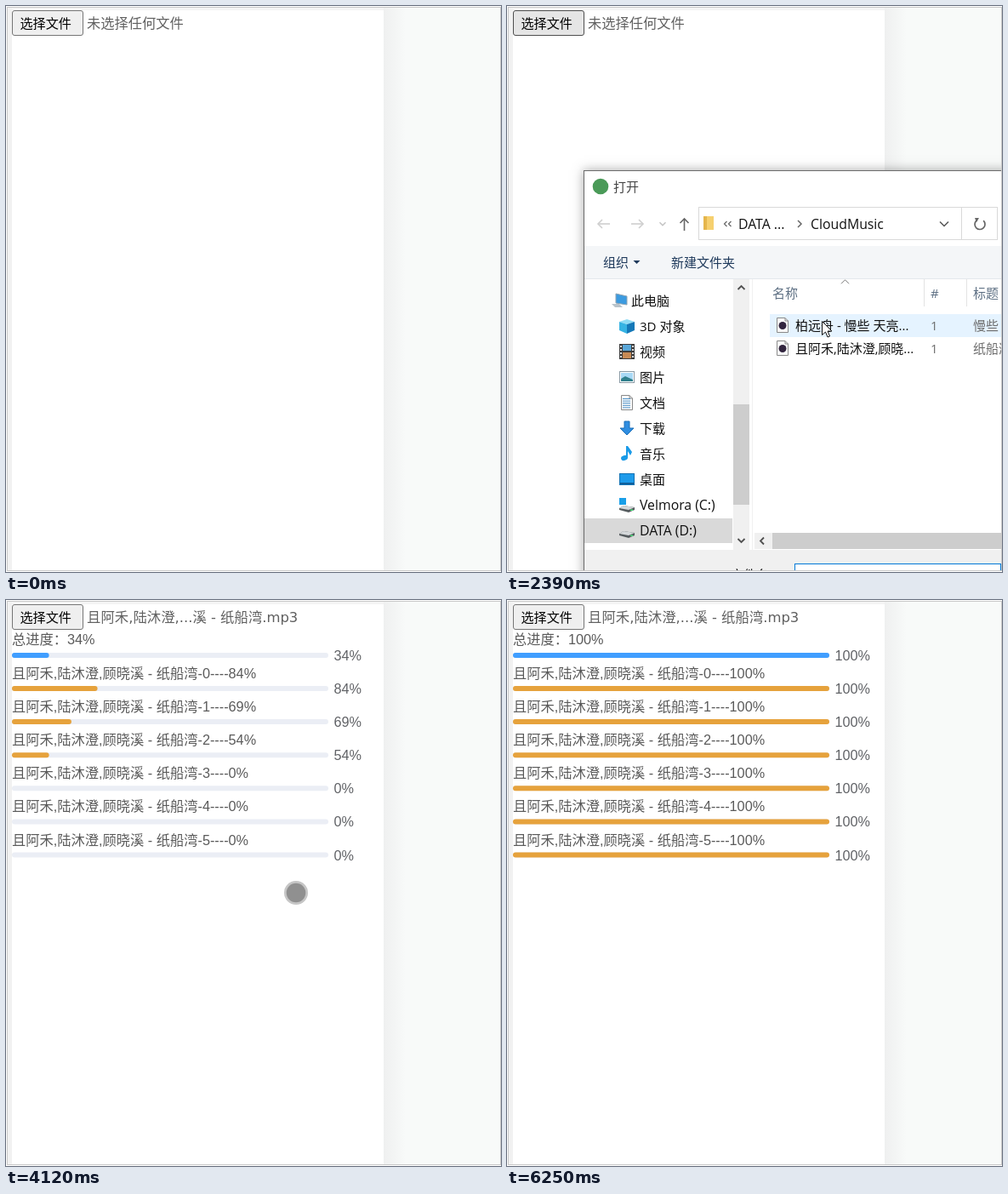
An HTML page with a canvas that plays this animation: 582x665 px, repeating every 6330 ms.

```html
<!DOCTYPE html>
<html lang="zh-CN">
<head>
<meta charset="utf-8">
<title>分片上传</title>
<style>
html, body { margin: 0; width: 100%; height: 100%; overflow: hidden; background: #fff; }
canvas { display: block; width: 582px; height: 665px; }
</style>
</head>
<body>
<canvas id="stage" width="582" height="665"></canvas>
<script>
const ctx = document.getElementById('stage').getContext('2d');
const LOOP = 6330;
const CJK = '"Noto Sans CJK SC", "Noto Sans CJK", sans-serif';
const UI = '"Open Sans", "Noto Sans", ' + CJK;
const PAGE = '"Liberation Sans", ' + CJK;
const WIDE = '"DejaVu Sans", ' + CJK;

const SONG = '纸船湾';
const TRACK = '且阿禾,陆沐澄,顾晓溪 - ' + SONG;
const PICKED = '且阿禾,陆沐澄,...溪 - ' + SONG + '.mp3';

// Pointer stops: time, x, y. Touch dot in the page, arrow over the dialog.
const DOT = 'dot', ARROW = 'arrow';
const pointer = [
  [0], [70, 91, 655, DOT], [140, 80, 470, DOT], [210, 55, 210, DOT], [280, 38, 75, DOT],
  [450, 35, 62, DOT], [530, 38, 45, DOT], [600, 46, 33, DOT], [680, 51, 31, DOT],
  [830, 58, 32, DOT], [910, 64, 34, DOT],
  [1440, 110, 50, ARROW], [1520, 190, 70, ARROW], [1600, 255, 85, ARROW], [1680, 310, 88, ARROW],
  [1760, 360, 85, ARROW], [1840, 390, 82, ARROW], [1990, 378, 150, ARROW], [2080, 366, 232, ARROW],
  [2220, 366, 300, ARROW], [2300, 368, 345, ARROW], [2390, 370, 370, ARROW], [2460, 369, 405, ARROW],
  [3580, 362, 388, DOT], [3650, 350, 360, DOT], [3730, 342, 345, DOT], [3880, 341, 344, DOT],
  [5540, 325, 390, DOT], [5620, 280, 520, DOT], [5700, 247, 614, DOT],
  [5850, 210, 640, DOT], [5940, 152, 664, DOT], [6030]
];

// Progress reports: time, percent
const total = [[3988, 34], [4200, 50], [4390, 78], [4590, 100]];
const chunks = [
  [[3994, 84], [4200, 100]], [[4007, 69], [4210, 100]], [[4022, 54], [4220, 100]],
  [[4320, 84], [4480, 100]], [[4340, 69], [4590, 100]], [[4350, 54], [4520, 100]]
];

function rect(x, y, w, h, fill, stroke) {
  if (fill) { ctx.fillStyle = fill; ctx.fillRect(x, y, w, h); }
  if (stroke) {
    ctx.strokeStyle = stroke; ctx.lineWidth = 1;
    ctx.strokeRect(x + .5, y + .5, w - 1, h - 1);
  }
}

function round(x, y, w, h, r, fill, stroke) {
  ctx.beginPath();
  ctx.roundRect(x, y, w, h, r);
  ctx.fillStyle = fill; ctx.fill();
  if (stroke) { ctx.strokeStyle = stroke; ctx.lineWidth = 1; ctx.stroke(); }
}

function circle(x, y, r, fill) {
  ctx.beginPath();
  ctx.arc(x, y, r, 0, Math.PI * 2);
  ctx.fillStyle = fill; ctx.fill();
}

function path(points, fill, stroke, width = 1, close = !!fill) {
  ctx.beginPath();
  points.forEach(([x, y], i) => i ? ctx.lineTo(x, y) : ctx.moveTo(x, y));
  if (close) ctx.closePath();
  if (fill) { ctx.fillStyle = fill; ctx.fill(); }
  if (stroke) { ctx.strokeStyle = stroke; ctx.lineWidth = width; ctx.stroke(); }
}

// y is the middle of the line
function text(str, x, y, color = '#111', size = 15, family = UI) {
  ctx.font = size + 'px ' + family;
  ctx.fillStyle = color;
  ctx.fillText(str, x, y + size * .37);
}

// Chevron pointing along (dx, dy)
function chevron(x, y, dx, dy, s, color, width = 1.5) {
  path([[x - dx * s / 2 + dy * s, y - dy * s / 2 + dx * s], [x + dx * s / 2, y + dy * s / 2],
    [x - dx * s / 2 - dy * s, y - dy * s / 2 - dx * s]], null, color, width);
}

function arrow(x, y, dx, dy, color) {
  path([[x - dx * 7, y - dy * 7], [x + dx * 7, y + dy * 7]], null, color, 1.6);
  chevron(x + dx * 4.5, y + dy * 4.5, dx, dy, 5, color, 1.6);
}

// CSS "ease"
function ease(x) {
  if (x >= 1) return 1;
  const bez = (u, a, b) => 3 * u * (1 - u) ** 2 * a + 3 * u * u * (1 - u) * b + u ** 3;
  let lo = 0, hi = 1;
  for (let i = 0; i < 20; i++) {
    const mid = (lo + hi) / 2;
    if (bez(mid, .25, .25) < x) lo = mid; else hi = mid;
  }
  return bez(lo, .1, 1);
}

function percent(steps, t) {
  return steps.reduce((p, [at, v]) => t >= at ? v : p, 0);
}

// Each report restarts a 600 ms width transition from the current width
function barWidth(steps, t) {
  let from = 0, to = 0, start = 0;
  const now = at => from + (to - from) * ease((at - start) / 600);
  for (const [at, v] of steps) {
    if (t < at) break;
    from = now(at); to = v; start = at;
  }
  return now(t);
}

function drawPage(t) {
  rect(0, 0, 582, 665, '#fff');
  rect(2, 2, 579, 662, '#f8faf9');
  rect(2, 2, 442, 3, '#f4f4f4');
  rect(2, 2, 5, 662, '#f1f1f1');
  const shade = ctx.createLinearGradient(444, 0, 470, 0);
  shade.addColorStop(0, '#eff0f0');
  shade.addColorStop(1, '#f8faf9');
  rect(444, 2, 26, 662, shade);
  rect(7, 5, 437, 659, '#fff');

  const active = t >= 830 && t < 3580;
  round(7.5, 5.5, 83, 29, 2.5, active ? '#e5e5e5' : '#efefef', active ? '#4f4f4f' : '#767676');
  text('选择文件', 16.5, 20, '#000', 15.1);
  if (t < 3100) text('未选择任何文件', 95, 20, '#606060', 16.25);
  else text(PICKED, 95, 20, '#606060', 16.4, WIDE);
  if (t >= 3580) drawProgress(t);
}

function bar(label, steps, t, labelY, y, color) {
  const p = percent(steps, t) + '%', w = barWidth(steps, t) * 3.72;
  text(label + p, 7, labelY, '#5a5a5a', 16.25, PAGE);
  round(7, y - 3, 372, 6, 3, '#ebeef5');
  if (w > 0) round(7, y - 3, w, 6, Math.min(3, w / 2), color);
  text(p, 385.5, y, '#606266', 16.25, PAGE);
}

function drawProgress(t) {
  bar('总进度：', total, t, 46, 65, '#409eff');
  chunks.forEach((c, i) => {
    bar(TRACK + '-' + i + '----', c, t, 86 + 39.1 * i, 104 + 39.1 * i, '#e6a23c');
  });
}

function sheet(x, y) {
  path([[x + .5, y + .5], [x + 10, y + .5], [x + 13.5, y + 4], [x + 13.5, y + 17.5], [x + .5, y + 17.5]],
    '#fafafa', '#8a8a8a');
  path([[x + 10, y + .5], [x + 10, y + 4], [x + 13.5, y + 4]], null, '#8a8a8a');
}

function audio(x, y) {
  sheet(x, y);
  circle(x + 7, y + 9.5, 4.5, '#33263f');
}

function pin(x, y) {
  ctx.save();
  ctx.translate(x, y);
  ctx.rotate(Math.PI / 4);
  rect(-3, -6, 6, 6, '#8a9299');
  rect(-5, 0, 10, 2, '#8a9299');
  rect(-.75, 2, 1.5, 6, '#8a9299');
  ctx.restore();
}

function drive(x, y) {
  path([[x, y + 2], [x + 5, y - 1], [x + 18, y + 1], [x + 18, y + 4], [x + 11, y + 7], [x, y + 4]], '#555b5e');
  path([[x, y + 2], [x + 5, y - 1], [x + 18, y + 1], [x + 11, y + 4]], '#d5d8da');
  rect(x + 13, y + 3.5, 3, 1.5, '#4be07a');
}

const icons = {
  pc(x, y) {
    path([[x + 5, y - 8], [x + 18, y - 5], [x + 18, y + 5], [x + 5, y + 3]], '#3c9be0', '#8fa4b3');
    path([[x, y + 4], [x + 9, y + 4], [x + 13, y + 8], [x + 4, y + 8]], '#b9c3ca');
  },
  cube(x, y) {
    path([[x, y - 5], [x + 9, y - 8], [x + 18, y - 5], [x + 9, y - 2]], '#8fdcf5');
    path([[x, y - 5], [x + 9, y - 2], [x + 9, y + 9], [x, y + 5]], '#36b3e3');
    path([[x + 18, y - 5], [x + 9, y - 2], [x + 9, y + 9], [x + 18, y + 5]], '#1578b8');
  },
  film(x, y) {
    rect(x, y - 9, 18, 18, '#3d3d3d');
    rect(x + 4, y - 8, 10, 7, '#5aa7d8');
    rect(x + 4, y + 1, 10, 7, '#c78a55');
    for (let i = 0; i < 4; i++) {
      rect(x + 1, y - 7 + i * 4, 2, 2, '#ddd');
      rect(x + 15, y - 7 + i * 4, 2, 2, '#ddd');
    }
  },
  picture(x, y) {
    rect(x, y - 7, 18, 14, '#fff', '#8a9aa5');
    rect(x + 2, y - 5, 14, 10, '#a8d8f5');
    path([[x + 2, y + 5], [x + 2, y + 2], [x + 7, y - 1], [x + 16, y + 3], [x + 16, y + 5]], '#2f7f8c');
  },
  doc(x, y) {
    sheet(x + 2, y - 9);
    for (let i = 0; i < 5; i++) rect(x + 4, y - 5 + i * 2.6, 9, 1, '#4a90c8');
  },
  down(x, y) {
    path([[x + 6, y - 8], [x + 12, y - 8], [x + 12, y], [x + 17, y], [x + 9, y + 8], [x + 1, y], [x + 6, y]],
      '#2f8de0', '#1b6fb8');
  },
  note(x, y) {
    ctx.beginPath();
    ctx.ellipse(x + 6, y + 5, 4, 3, -.3, 0, 7);
    ctx.fillStyle = '#1a9be8'; ctx.fill();
    path([[x + 8, y - 9], [x + 10, y - 9], [x + 15, y - 2], [x + 13, y + 2], [x + 10, y - 3], [x + 10, y + 5],
      [x + 8, y + 5]], '#1a9be8');
  },
  desk(x, y) {
    rect(x, y - 7, 18, 14, '#1e9bea', '#1272b4');
    rect(x + 1, y + 4, 16, 2, '#0f5f9a');
  },
  system(x, y) {
    drive(x, y + 2);
    rect(x, y - 8, 8, 8, '#1a9fe8');
  },
  drive(x, y) { drive(x, y + 2); }
};

const quick = ['桌面', '下载', '文档', '图片', '_posts', 'api', 'CloudMusic', '本科毕业论文（讨论稿）'];
const places = [
  ['pc', '此电脑'], ['cube', '3D 对象'], ['film', '视频'], ['picture', '图片'], ['doc', '文档'],
  ['down', '下载'], ['note', '音乐'], ['desk', '桌面'], ['system', 'Velmora (C:)'], ['drive', 'DATA (D:)']
];
const fit = s => /[a-z]|DATA/.test(s) ? 15.8 : 15;

function drawSidebar(ready) {
  ctx.save();
  ctx.beginPath();
  ctx.rect(91, 321, 174, 318);
  ctx.clip();
  if (ready) {
    rect(91, 602, 174, 29, '#d9d9d9');
    places.forEach(([icon, name], i) => {
      const y = 346 + 30 * i;
      icons[icon](i ? 132 : 123, y);
      text(name, i ? 156 : 146, y, '#111', fit(name));
    });
  } else {
    text('快速访问', 146, 356);
    quick.forEach((name, i) => {
      const y = 386 + 30 * i;
      sheet(134, y - 9);
      text(name, 156, y, '#111', fit(name));
      if (i < 4) pin(255, y);
    });
    text('Nuvidrel - Personal', 146, 636, '#111', 15.8);
  }
  ctx.restore();
  rect(266, 321, 19, 318, '#f0f0f0');
  if (ready) rect(266, 468, 19, 118, '#cdcdcd');
  else rect(266, 342, 19, 207, '#cdcdcd');
  chevron(275.5, 331, 0, -1, 4, '#505050', 1.8);
  chevron(275.5, 628, 0, 1, 4, '#505050', 1.8);
}

function drawToolbar() {
  arrow(114, 256, -1, 0, '#cfcfcf');
  arrow(153, 256, 1, 0, '#cfcfcf');
  chevron(183, 256, 0, 1, 3.5, '#c4c4c4');
  arrow(208.5, 257, 0, -1, '#666');
  rect(225, 236, 310, 39, '#fff', '#d9d9d9');
  rect(534, 236, 43, 39, '#fff', '#d9d9d9');
  rect(231, 247, 12, 16, '#f6d06f');
  rect(231, 247, 4, 16, '#e5b64c');
  chevron(257, 256, -1, 0, 3, '#666', 1.2);
  chevron(262, 256, -1, 0, 3, '#666', 1.2);
  text('DATA ...', 272, 256, '#111', 15.8);
  chevron(344, 256, 1, 0, 4, '#666');
  text('CloudMusic', 357, 256, '#111', 15.8);
  chevron(514, 256, 0, 1, 5, '#555');
  ctx.beginPath();
  ctx.arc(556, 256.5, 6, -.8, 4.2);
  ctx.strokeStyle = '#666'; ctx.lineWidth = 1.7; ctx.stroke();
  path([[550, 249], [555, 249], [552, 254]], '#666');
  text('组织', 113, 301, '#1e395b');
  path([[148.5, 299], [156.5, 299], [152.5, 303]], '#1e395b');
  text('新建文件夹', 193, 301, '#1e395b');
}

function drawFiles(t, ready) {
  text('名称', 312, 337, '#5d6f83');
  text('#', 498, 337, '#5d6f83');
  text('标题', 548, 337, '#5d6f83');
  chevron(397.5, 324, 0, -1, 4.5, '#777', 1);
  rect(490, 321, 1, 32, '#e3e3e3');
  rect(540, 321, 1, 32, '#e3e3e3');

  if (t >= 2460) rect(309, 389, 273, 27, '#cce8ff');
  else if (t >= 2390) rect(309, 362, 273, 27, '#e5f3ff');
  const files = [['柏远舟 - 慢些 天亮...', '慢些'], ['且阿禾,陆沐澄,顾晓...', SONG]];
  files.forEach(([name, title], i) => {
    const y = 375 + 27 * i;
    (ready || i ? audio : sheet)(317, y - 9);
    text(name, 339, y + .5);
    if (ready) {
      text('1', 498, y + .5, '#6d6d6d');
      text(title, 548, y + .5, '#6d6d6d');
    }
  });
  rect(291, 619, 291, 19, '#f0f0f0');
  rect(312, 619, 270, 19, '#cdcdcd');
  chevron(300, 628.5, -1, 0, 4, '#505050', 1.8);
}

function drawDialog(t) {
  const ready = t >= 1680;
  ctx.save();
  if (t < 1520 || t >= 2780) ctx.globalAlpha = t >= 2850 ? .2 : .5;
  ctx.save();
  ctx.shadowColor = 'rgba(0,0,0,.35)';
  ctx.shadowBlur = 12;
  rect(90, 193, 520, 500, '#fff');
  ctx.restore();
  rect(90, 193, 520, 500, '#fff', '#6b6b6b');
  circle(110, 212, 9.3, '#4a9a58');
  text('打开', 125, 212, '#444');
  rect(91, 282, 491, 38, '#f4f6f8');
  rect(91, 320, 491, 1, '#e4e8ec');
  if (ready) drawToolbar();
  drawSidebar(ready);
  rect(288, 321, 1, 318, '#f0f0f0');
  drawFiles(t, ready);

  rect(91, 639, 491, 26, '#f0f0f0');
  if (ready) {
    text('文件名', 263, 668);
    rect(338, 655, 243, 30, '#fff', t < 2460 ? '#0078d7' : '#7a7a7a');
  } else {
    rect(259, 659, 71, 6, '#fff');
    rect(338, 655, 244, 10, '#fff');
  }
  ctx.restore();
}

function drawPointer(t) {
  const [, x, y, kind] = pointer.filter(p => p[0] <= t).pop();
  if (kind === DOT) {
    circle(x, y, 14, '#c6c6c6');
    circle(x, y, 11.3, '#909090');
  } else if (kind === ARROW) {
    const shape = [[0, 0], [0, 16], [4, 12.5], [6.5, 18.5], [9, 17.5], [6.5, 11.5], [11.5, 11.5]];
    path(shape.map(([dx, dy]) => [x + .5 + dx, y + .5 + dy]), '#fff', '#111');
  }
}

function draw(t) {
  drawPage(t);
  if (t >= 1440 && t < 2930) drawDialog(t);
  drawPointer(t);
  rect(0, 0, 582, 1, '#fff');
  rect(0, 664, 582, 1, '#fff');
  rect(1, 1, 581, 663, null, '#c8c8c8');
}

const start = performance.now();
function tick() {
  draw((performance.now() - start) % LOOP);
  requestAnimationFrame(tick);
}
tick();
</script>
</body>
</html>
```
